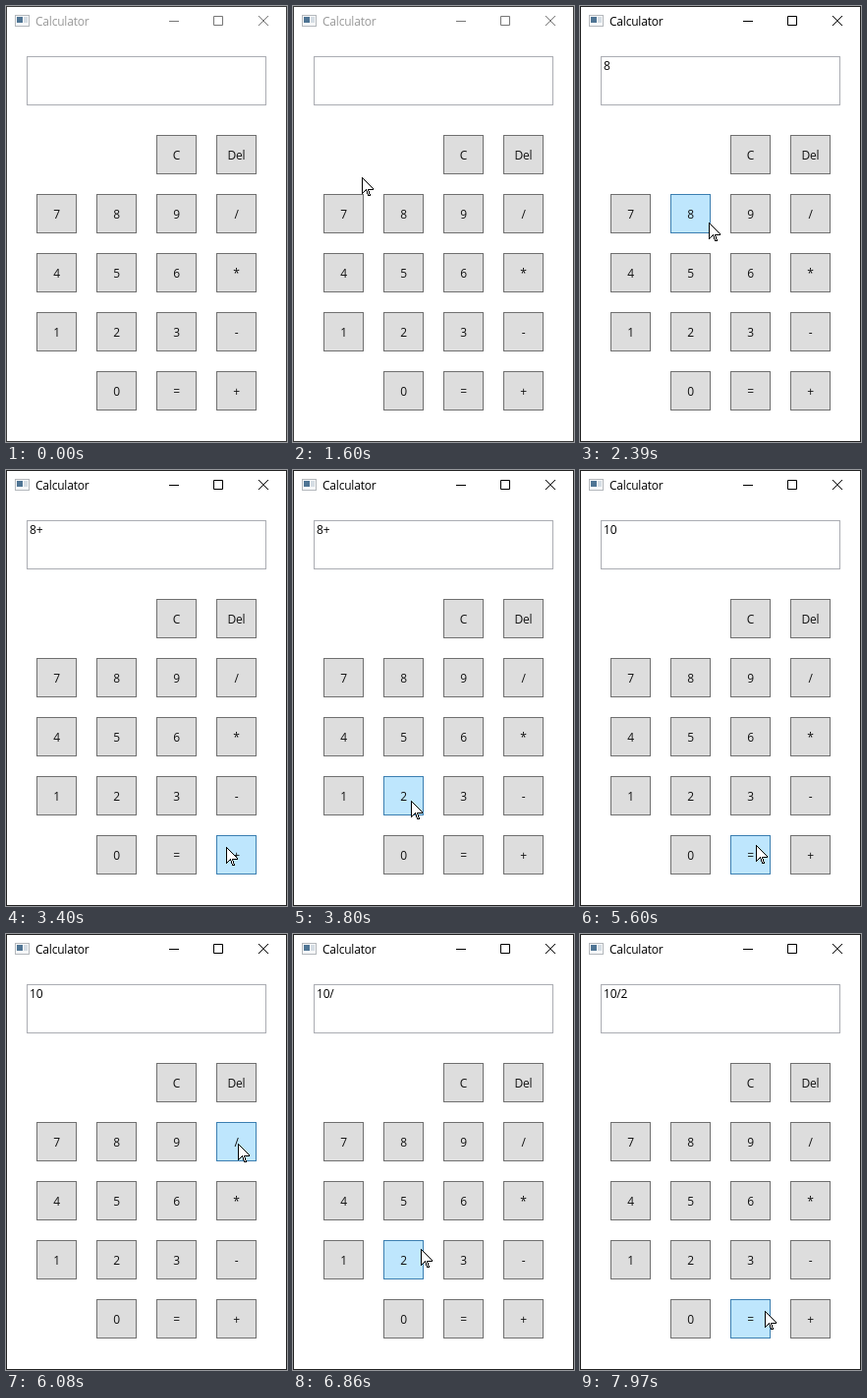
An HTML page that plays this animation: 286 px wide and 443 px high, repeating every 8 s.

```html
<!DOCTYPE html>
<html lang="en">
<head>
<meta charset="utf-8">
<title>Calculator</title>
<style>
  html, body { margin: 0; width: 100%; height: 100%; overflow: hidden; background: #fff; }
  svg { display: block; }
  text { font: 12px "Open Sans", "Noto Sans", sans-serif; letter-spacing: -.2px; fill: #000; }
  .frame { fill: #fff; stroke: #222; }
  .glyph { fill: none; stroke: #000; }
  .inactive .frame { stroke: #3a3a3a; }
  .inactive .glyph { stroke: #777; }
  .inactive .title { fill: #999; }
  .field { fill: #fff; stroke: #abadb3; }
  .key rect { fill: #ddd; stroke: #707070; }
  .key text { text-anchor: middle; fill: #111; }
  .key.hover rect { fill: #bee6fd; stroke: #3c7fb1; }
  .key.down rect { fill: #c4e5f6; stroke: #2c628b; }
  #cursor { fill: #fff; stroke: #000; shape-rendering: crispEdges; }
</style>
</head>
<body>
<svg id="win" width="286" height="443" viewBox="0 0 286 443">
  <rect class="frame" x=".5" y=".5" width="285" height="442"/>
  <g id="icon">
    <rect x="9.5" y="9.5" width="14" height="11" fill="#f6f7f8" stroke="#b4b8bc"/>
    <rect x="11" y="11" width="6" height="6" fill="#4f7594"/>
    <rect x="18" y="11" width="4" height="6" fill="#d5dde4"/>
  </g>
  <text class="title" x="30" y="20">Calculator</text>
  <path class="glyph" d="M166 15.5h10M211.5 10.5h9v9h-9z"/>
  <path class="glyph" d="M257 10l10 10M267 10l-10 10"/>
  <rect class="field" x="21.5" y="51.5" width="243" height="49"/>
  <text id="display" x="24" y="65"></text>
  <g id="keys"></g>
  <path id="cursor" d="M.5 .5V16.5L4.5 12.5L6.5 18.5H8.5L6.5 12.5H11.5V11.5Z"/>
</svg>
<script>
const LOOP = 8000;
const STEP = 80;
const PITCH_X = 61, PITCH_Y = 60, KEY_W = 41, KEY_H = 40;
const ROWS = ["_ _ C Del", "7 8 9 /", "4 5 6 *", "1 2 3 -", "_ 0 = +"];

// Pointer moves: start time, steps, destination
const ENTRY = { x: 44, y: 157 };
const MOVES = [
  { at: 1440, steps: 8, x: 126, y: 212 },
  { at: 2390, steps: 8, x: 244, y: 392 },
  { at: 3320, steps: 8, x: 114, y: 333 },
  { at: 4410, steps: 5, x: 176, y: 391 },
  { at: 5600, steps: 7, x: 236, y: 213 },
  { at: 6620, steps: 5, x: 118, y: 332 },
  { at: 7650, steps: 5, x: 188, y: 383 }
];
// Button down and up times
const CLICKS = [[2150, 2230], [3090, 3240], [4030, 4180], [4970, 5050], [6310, 6390], [7420, 7420]];

const $ = id => document.getElementById(id);
const ease = p => p * p * (3 - 2 * p);
const mix = (a, b, p) => Math.round(a + (b - a) * p);

function add(parent, tag, attrs, text = "") {
  const el = document.createElementNS("http://www.w3.org/2000/svg", tag);
  for (const name in attrs) el.setAttribute(name, attrs[name]);
  el.textContent = text;
  return parent.appendChild(el);
}

const keys = [];
ROWS.forEach((row, r) => row.split(" ").forEach((label, c) => {
  if (label === "_") return;
  const x = 31 + c * PITCH_X, y = 131 + r * PITCH_Y;
  const el = add($("keys"), "g", { class: "key" });
  add(el, "rect", { x: x + .5, y: y + .5, width: KEY_W - 1, height: KEY_H - 1 });
  add(el, "text", { x: x + KEY_W / 2, y: y + 25 }, label);
  keys.push({ el, x, y, label });
}));

function pointerAt(t) {
  const i = MOVES.filter(move => move.at <= t).length - 1;
  if (i < 0) return null;
  const from = MOVES[i - 1] || ENTRY, to = MOVES[i];
  const step = Math.floor((t - to.at) / STEP) + 1;
  const p = ease(Math.min(1, step / to.steps));
  return { x: mix(from.x, to.x, p), y: mix(from.y, to.y, p) };
}

function keyAt(tip) {
  return tip && keys.find(({ x, y }) =>
    tip.x >= x && tip.x < x + KEY_W && tip.y >= y && tip.y < y + KEY_H);
}

function calculate(sum) {
  const [, a, op, b] = sum.match(/(\d+)(\D)(\d+)/);
  return String({ "+": +a + +b, "-": a - b, "*": a * b, "/": a / b }[op]);
}

function entryAt(t) {
  return CLICKS.filter(([, up]) => up <= t).reduce((entry, [, up]) => {
    const { label } = keyAt(pointerAt(up));
    return label === "=" ? calculate(entry) : entry + label;
  }, "");
}

function render(t) {
  const tip = pointerAt(t);
  const over = keyAt(tip);
  const pressed = CLICKS.some(([down, up]) => t >= down && t < up);

  $("win").setAttribute("class", t < CLICKS[0][0] ? "inactive" : "");
  $("display").textContent = entryAt(t);
  for (const key of keys) {
    const state = key !== over ? "" : pressed ? " down" : " hover";
    key.el.setAttribute("class", "key" + state);
  }
  $("cursor").style.display = tip ? "" : "none";
  if (tip) $("cursor").setAttribute("transform", `translate(${tip.x} ${tip.y})`);
}

const origin = performance.now();
function tick() {
  render((performance.now() - origin) % LOOP);
  requestAnimationFrame(tick);
}
tick();
</script>
</body>
</html>
```
